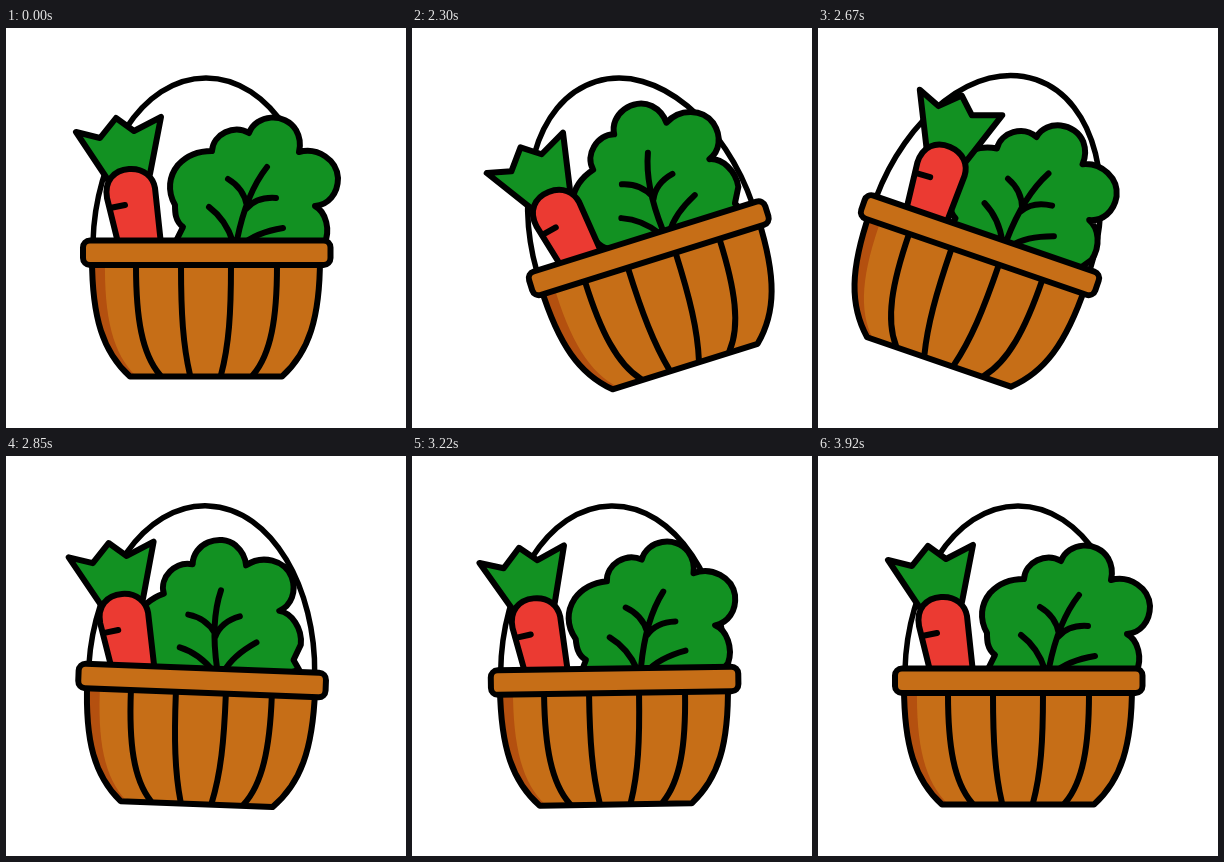
Write an HTML page that moves like this. It is 400 px wide and 400 px high and loops after 3950 ms.

```html
<!DOCTYPE html>
<html lang="en">
<head>
<meta charset="utf-8">
<title>Vegetable basket</title>
<style>
  html, body { margin: 0; width: 100%; height: 100%; overflow: hidden; background: #fff; }
  svg { display: block; width: 100%; height: 100%; }
</style>
</head>
<body>
<svg viewBox="0 0 400 400" fill="none" stroke="#000" stroke-width="6" stroke-linecap="round" stroke-linejoin="round">
  <g id="basket">
    <path stroke-width="5.5" d="M87 214C89 130 135 50 200 50S311 130 313 214"/>

    <g id="lettuce">
      <path fill="#129122" d="M166 240L171 211L177 199C169 193 169 184 169 177C161 163 163 148 172 137
        C182 126 194 123 206 123C207 106 228 96 243 105C250 86 279 84 290 102C294 109 295 116 293 124
        C312 119 331 132 332 150C332 166 322 177 309 178C320 184 325 202 318 217L306 229L308 240Z"/>
      <path d="M261 139C246 158 237 182 231 212L227 240M222 151C234 158 239 167 241 178
        M270 170C256 169 246 174 240 181M203 179C215 188 222 198 227 214M277 200C259 203 246 208 236 217"/>
    </g>

    <g id="carrot">
      <path fill="#129122" d="M70 104L94 110L110 90L128 103L155 89L144 146L102 152Z"/>
      <path fill="#eb3a32" d="M117 235L101 170C98 153 108 142 123 141C138 140 147 149 149 160L157 235Z"/>
      <path d="M104 180L119 177"/>
    </g>

    <path fill="#c66e17" stroke="none" d="M86 230C86 290 97 324 124 348.500H276C303 324 314 290 314 230Z"/>
    <path fill="#b4500f" stroke="none" d="M86 230H99C98 290 107 326 130 348H124C97 324 86 290 86 230Z"/>
    <path d="M86 230C86 290 97 324 124 348.500H276C303 324 314 290 314 230"/>
    <path d="M130 238C130 290 136 326 154 347M175 238C175 285 177 317 184 347
      M225 238C225 285 223 317 215 347M271 238C271 290 265 326 247 347"/>
    <rect x="77" y="212.500" width="247.500" height="24.500" rx="7" fill="#c66e17"/>
  </g>
</svg>
<script>
  const LOOP = 3950;

  // Each part swings about its pivot through [time in ms, angle in degrees] keys.
  const parts = [
    { id: 'basket', pivot: '204 105',
      keys: [[1990, 0], [2105, 10.5], [2333, -19], [2667, 19], [3000, -10], [3430, 7.5], [3925, 0]] },
    { id: 'lettuce', pivot: '225 253',
      keys: [[1990, 0], [2320, -16], [2590, -6], [2870, -22], [3380, 0]] },
    { id: 'carrot', pivot: '128 265',
      keys: [[1990, 0], [2150, -6], [2560, 12], [2900, -3.5], [3380, 0]] }
  ];
  for (const part of parts) part.node = document.getElementById(part.id);

  const ease = u => u * u * (3 - 2 * u);

  function angleAt(keys, time) {
    const next = keys.findIndex(([end]) => time < end);
    if (next < 1) return 0;
    const [t0, a0] = keys[next - 1];
    const [t1, a1] = keys[next];
    return a0 + (a1 - a0) * ease((time - t0) / (t1 - t0));
  }

  function draw(time) {
    for (const { node, pivot, keys } of parts) {
      node.setAttribute('transform', `rotate(${angleAt(keys, time)} ${pivot})`);
    }
  }

  const start = performance.now();
  function tick() {
    draw((performance.now() - start) % LOOP);
    requestAnimationFrame(tick);
  }
  tick();
</script>
</body>
</html>
```
